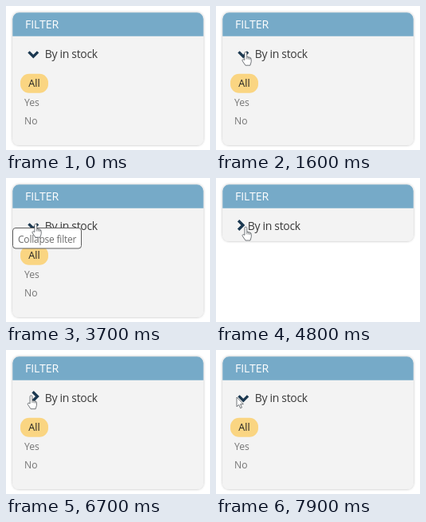
Recreate the animation shown at these times as an HTML page. Size 256 by 180 pixels, loop 8000 ms.

```html
<!DOCTYPE html>
<html lang="en">
<head>
<meta charset="utf-8">
<title>Filter panel</title>
<style>
  html, body { margin: 0; width: 100%; height: 100%; overflow: hidden; background: #fff; }
  svg { display: block; width: 100vw; height: 100vh; }
  text { font-family: "Open Sans", "Noto Sans", sans-serif; }
</style>
</head>
<body>
<svg viewBox="0 0 256 180">
  <defs>
    <filter id="shadow" x="-10%" y="-10%" width="120%" height="125%">
      <feDropShadow dx="0" dy="0" stdDeviation="1.8" flood-color="#000" flood-opacity="0.3"/>
    </filter>
  </defs>

  <rect id="panel" x="8.3" y="8.3" width="239.4" rx="8" fill="#f3f3f3" filter="url(#shadow)"/>
  <path d="M8.3 37.8V16.3a8 8 0 0 1 8-8H239.7a8 8 0 0 1 8 8V37.8z" fill="#76aac8"/>
  <text x="24" y="28.2" font-size="14.2" letter-spacing="-0.12" fill="#fff">FILTER</text>

  <path id="chevron" d="M-5.8-2.9L0 2.9L5.8-2.9" fill="none" stroke="#1b3850" stroke-width="3.4"/>
  <text id="label" y="65" font-size="14" letter-spacing="-0.32" fill="#3a3a3a">By in stock</text>

  <g id="options" font-size="12.2" fill="#757575">
    <rect x="18" y="84.8" width="35" height="24" rx="11" fill="#fad582"/>
    <text x="28.3" y="101.3" font-size="12.6" fill="#222">All</text>
    <text x="23" y="125.4">Yes</text>
    <text x="23" y="147.8">No</text>
  </g>

  <g id="tip">
    <rect x="8.5" y="62.5" width="86" height="25.5" rx="3.5" fill="#fff" stroke="#5c5c5c"/>
    <text x="15" y="80.5" font-size="12" letter-spacing="-0.22" fill="#6c6c6c">Collapse filter</text>
  </g>

  <g id="cursor" fill="#fff" stroke="#50555a" stroke-width="0.8" stroke-linejoin="round">
    <path id="arrow" d="M0 0V11.8L2.7 9.4L4.6 13.7L6.5 12.9L4.6 8.7H8.3z"/>
    <g id="hand">
      <path d="M-1.4 10V1.3a1.4 1.4 0 0 1 2.8 0V6l3.8 .8q1.7 .4 1.7 2.2v3.3l-1.3 4.4h-6l-3.6-5.3q-.8-1.4 .3-2 1-.4 2.3 .6z"/>
      <path d="M1.4 6v3M3.4 6.5v2.8M5.3 7v2.6" fill="none" stroke-width="0.7"/>
    </g>
  </g>
</svg>

<script>
const LOOP = 8000, STEP = 100;
const el = id => document.getElementById(id);
const [panel, chevron, label, options, tip, cursor, arrow, hand] =
  ["panel", "chevron", "label", "options", "tip", "cursor", "arrow", "hand"].map(el);

const clamp = v => Math.min(1, Math.max(0, v));
const ease = v => v * v * (3 - 2 * v);
const mix = (a, b, k) => a + (b - a) * k;
const show = (node, on) => node.setAttribute("visibility", on ? "visible" : "hidden");
const move = (node, x, y, turn = 0) =>
  node.setAttribute("transform", `translate(${x} ${y}) rotate(${turn})`);

// Each toggle: time, open state, time the chevron takes to turn.
const toggles = [[-1000, true, 300], [2200, false, 300], [3200, true, 200],
                 [4300, false, 200], [6700, true, 300]];

// Pointer path: time, x, y.
const path = [[800, 46, 184], [1600, 37.3, 57.5], [4700, 37.3, 57.5],
              [5400, 39, 127], [5600, 39, 127], [5700, 37.6, 111],
              [6200, 31.5, 57], [7000, 31.5, 57], [7400, 29, 58],
              [7500, 29, 58], [7900, 26, 59]];

function pointer(t) {
  const i = path.findIndex(p => p[0] > t);
  if (i < 0) return path[path.length - 1].slice(1);
  if (i === 0) return path[0].slice(1);
  const [t0, x0, y0] = path[i - 1], [t1, x1, y1] = path[i];
  const k = ease((t - t0) / (t1 - t0));
  return [mix(x0, x1, k), mix(y0, y1, k)];
}

function render(time) {
  const t = Math.floor((time % LOOP) / STEP) * STEP;
  const [start, open, span] = toggles.filter(s => s[0] <= t).pop();
  const turned = ease(clamp((t - start) / span));

  panel.setAttribute("height", open ? 165.7 : 70.7);
  show(options, open);
  label.setAttribute("x", open ? 48.7 : 39.7);
  if (open) move(chevron, mix(36.5, 34.3, turned), mix(58, 60.3, turned), -90 * (1 - turned));
  else move(chevron, 31, 59, -90 * turned);

  const fade = t < 4300 ? clamp((t - 3400) / 200) : 0;
  tip.setAttribute("opacity", fade);

  const [x, y] = pointer(t);
  const overChevron = y < 68 && t < 7400;
  move(cursor, x, y);
  cursor.setAttribute("opacity", t < 900 ? 0 : 1);
  show(hand, overChevron);
  show(arrow, !overChevron);
}

function frame() {
  render(performance.now());
  requestAnimationFrame(frame);
}
frame();
</script>
</body>
</html>
```
